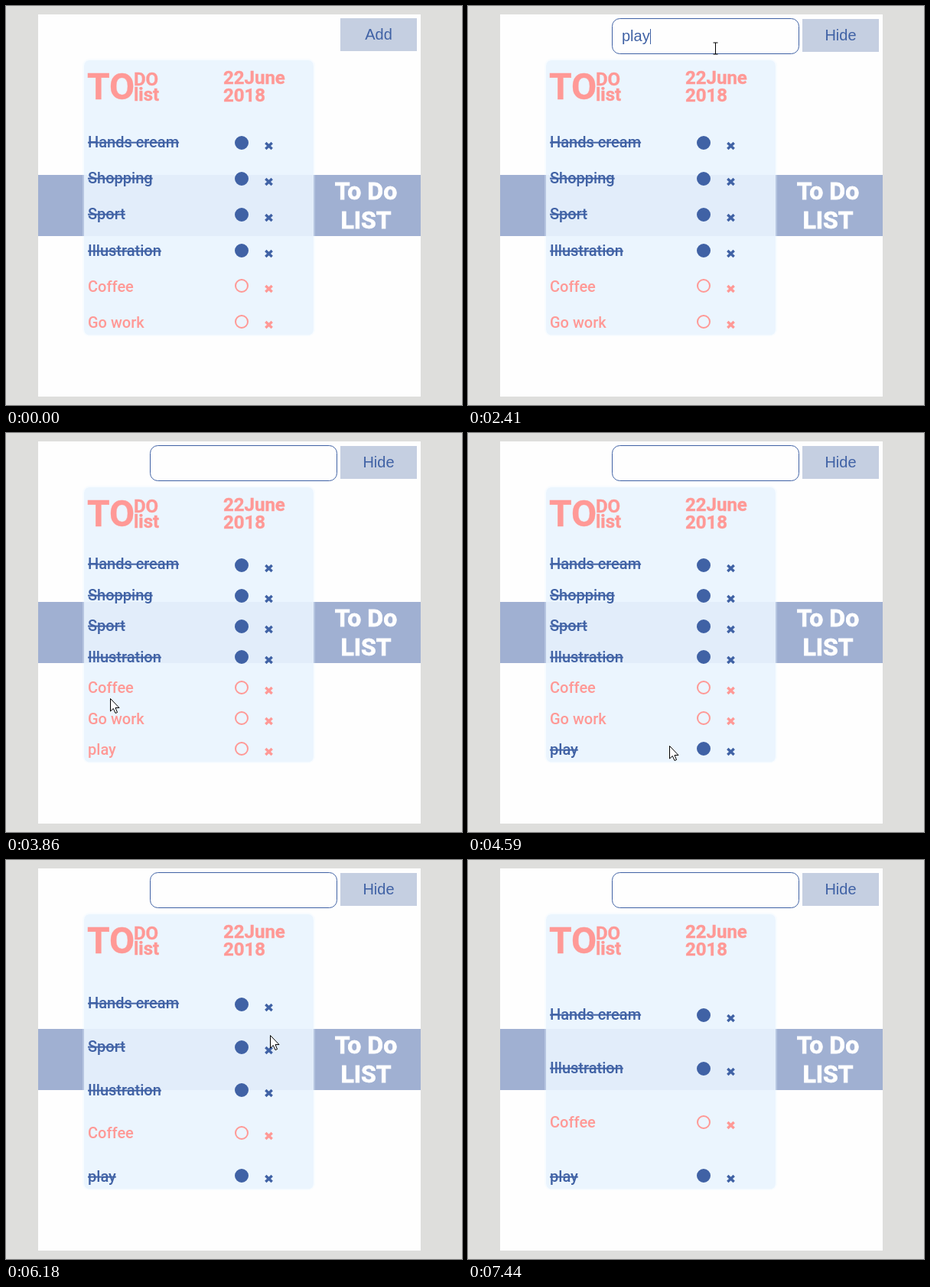
An HTML page for the animation above (7.97 s loop, 596x522 px).

```html
<!DOCTYPE html>
<html lang="en">
<head>
<meta charset="utf-8">
<title>To do list</title>
<style>
html, body { margin: 0; width: 100%; height: 100%; overflow: hidden; background: #dededc; }
svg { display: block; font: 500 20px Roboto, sans-serif; }
.title { font-weight: 700; font-size: 24px; fill: #ff9996; stroke: #ff9996; stroke-width: .4px; }
.big { font-size: 48px; }
.label { font-weight: 700; font-size: 32px; fill: #fff; stroke: #fff; stroke-width: .8px; text-anchor: middle; }
.ui { font: 400 20px "Liberation Sans", Arial, sans-serif; fill: #4062a5; }
.mid { text-anchor: middle; }
.done { text-decoration: line-through; text-decoration-thickness: 2px; }
</style>
</head>
<body>
<svg width="596" height="522" viewBox="0 0 596 522">
  <rect x="42" y="11" width="500" height="500" fill="#fefefe"/>
  <rect x="42" y="221" width="500" height="80" fill="#a0b0d2"/>
  <text class="label" x="470.5" y="253">To Do</text>
  <text class="label" x="470.5" y="291">LIST</text>
  <rect x="101" y="70" width="302" height="361" rx="8" fill="none" stroke="#e9f4fe" stroke-width="2" stroke-opacity=".3"/>
  <rect x="102" y="71" width="300" height="359.5" rx="7" fill="#e9f4fe" fill-opacity=".9"/>
  <text class="title big" x="106" y="122">TO</text>
  <text class="title" x="167" y="104">DO</text>
  <text class="title" x="167" y="124">list</text>
  <text class="title" x="284" y="102">22June</text>
  <text class="title" x="284" y="125">2018</text>
  <g id="live"></g>
</svg>
<script>
const LOOP = 7970, OPEN = 540, FOCUS = 1000, TYPE = 1620, KEY = 195, ADDED = 3000, BLUR = 4390;
const BLUE = '#4062a5', PINK = '#ff9996', WORD = 'play';
const live = document.getElementById('live');
const pen = document.createElement('canvas').getContext('2d');
pen.font = '20px "Liberation Sans", Arial, sans-serif';

// Times at which each task appears, is ticked off and is deleted
const tasks = [
  { text: 'Hands cream', done: 0 },
  { text: 'Shopping', done: 0, to: 6110 },
  { text: 'Sport', done: 0, to: 6800 },
  { text: 'Illustration', done: 0 },
  { text: 'Coffee' },
  { text: 'Go work', to: 5400 },
  { text: WORD, from: ADDED, done: BLUR }
];

// Pointer stops: departure time, then where it goes with a short eased move
const MOVE = 250, GONE = 7440;
const stops = [
  [70, 530, 315], [100, 494, 36], [570, 326, 72], [900, 294, 45], [2400, 520, 124],
  [2730, 500, 28], [3110, 554, 180], [3230, 276, 379], [3530, 136, 347], [4060, 118, 412],
  [4400, 265, 409], [4750, 343, 375], [5470, 346, 313], [5800, 345, 229], [6400, 345, 247],
  [6950, 371, 319], [7250, 478, 524]
];

function pointer(t) {
  if (t < stops[0][0] || t >= GONE) return null;
  const i = stops.findLastIndex(s => s[0] <= t);
  const [t1, x1, y1] = stops[i];
  const [, x0, y0] = stops[Math.max(i - 1, 0)];
  const end = i + 1 < stops.length ? stops[i + 1][0] : GONE;
  const rest = (1 - Math.min(1, (t - t1) / Math.min(MOVE, end - t1))) ** 3;
  return { x: x1 + (x0 - x1) * rest, y: y1 + (y0 - y1) * rest };
}

// Rows always fill the card, so the spacing depends on their count
function rows(t) {
  const list = tasks.filter(({ from = 0, to = LOOP }) => t >= from && t < to);
  const n = list.length;
  return list.map((task, i) => {
    const left = n - 1 - i;
    return {
      task,
      done: t >= task.done,
      base: Math.round(421 - left * 283.2 / n),
      dot: Math.round(413 - left * 280.3 / n)
    };
  });
}

function hovered(t) {
  const p = pointer(t);
  const row = p && rows(t).find(r => Math.abs(p.x - 343.5) < 7 && Math.abs(p.y - r.dot - 4) < 12);
  return row && row.task;
}

// Cross turns black under the pointer and fades back afterwards
function heat(task, t) {
  for (let lag = 0; lag < 200; lag += 20) if (hovered(t - lag) === task) return 1 - lag / 200;
  return 0;
}

function drawRow({ task, done, base, dot }, t) {
  const color = done ? BLUE : PINK, h = heat(task, t);
  const cross = (stroke, opacity) => `<path transform="translate(343.5 ${dot + 4})"
    d="M-4.2-4L4.2 4M4.2-4L-4.2 4" stroke-width="3.4" stroke="${stroke}" opacity="${opacity}"/>`;
  return `<text x="107" y="${base}" fill="${color}" class="${done ? 'done' : ''}">${task.text}</text>
    <circle cx="308" cy="${dot}" r="8" fill="${done ? color : 'none'}" stroke="${color}" stroke-width="2"/>
    ${cross(color, 1)}${h ? cross('#000', h) : ''}`;
}

function drawButton(open) {
  return `<rect x="437" y="${16 + open}" width="100" height="43" fill="#c5cfe1"/>
    <text class="ui mid" x="487" y="${44 + open}">${open ? 'Hide' : 'Add'}</text>`;
}

// Caret blinks from the latest focus, key press or submit
function caretOn(t, count) {
  if (t < FOCUS || t >= BLUR) return false;
  if (t < TYPE) return t < FOCUS + 200;
  const since = t < ADDED ? TYPE + (count - 1) * KEY : ADDED;
  return (t - since) % 1060 < 530;
}

function drawInput(t) {
  const count = t < TYPE || t >= ADDED ? 0 : Math.min(WORD.length, 1 + Math.floor((t - TYPE) / KEY));
  const text = WORD.slice(0, count);
  const x = Math.round(201 + pen.measureText(text).width);
  return `<rect x="188.5" y="16.5" width="244" height="46" rx="10" fill="#fefefe" stroke="${BLUE}"/>
    <text class="ui" x="201" y="46">${text}</text>` +
    (caretOn(t, count) ? `<rect x="${x}" y="30" width="1" height="20" fill="${BLUE}"/>` : '');
}

const shapes = {
  arrow: 'M0 0V16.5L3.8 13L6.5 19L9 18L6.5 12H11.5Z',
  hand: 'M-2 2Q-2 0 0 0T2 2V8Q4 6 5.3 8.5Q7.5 7 8.5 9.5Q11 9 11 12V16Q11 19 9 21V23H0V21L-6 14Q-5 11-2 14ZM2 8V12M5.3 8.5V12M8.5 9.5V12',
  beam: 'M-3-7.5H3M0-7.5V7.5M-3 7.5H3'
};

function drawPointer(t, open) {
  const p = pointer(t);
  if (!p) return '';
  const inside = (x0, y0, x1, y1) => p.x > x0 && p.x < x1 && p.y > y0 && p.y < y1;
  const kind = inside(437, 16, 537, 60) ? 'hand' : open && inside(188, 16, 433, 63) ? 'beam' : 'arrow';
  return `<path transform="translate(${Math.round(p.x) + .5} ${Math.round(p.y) + .5})"
    d="${shapes[kind]}" fill="#fff" stroke="#000"/>`;
}

function frame(now) {
  const t = now % LOOP, open = t >= OPEN;
  live.innerHTML = drawButton(+open) + (open ? drawInput(t) : '') +
    rows(t).map(r => drawRow(r, t)).join('') + drawPointer(t, open);
  requestAnimationFrame(() => frame(performance.now() - start));
}

const start = performance.now();
frame(0);
</script>
</body>
</html>
```
